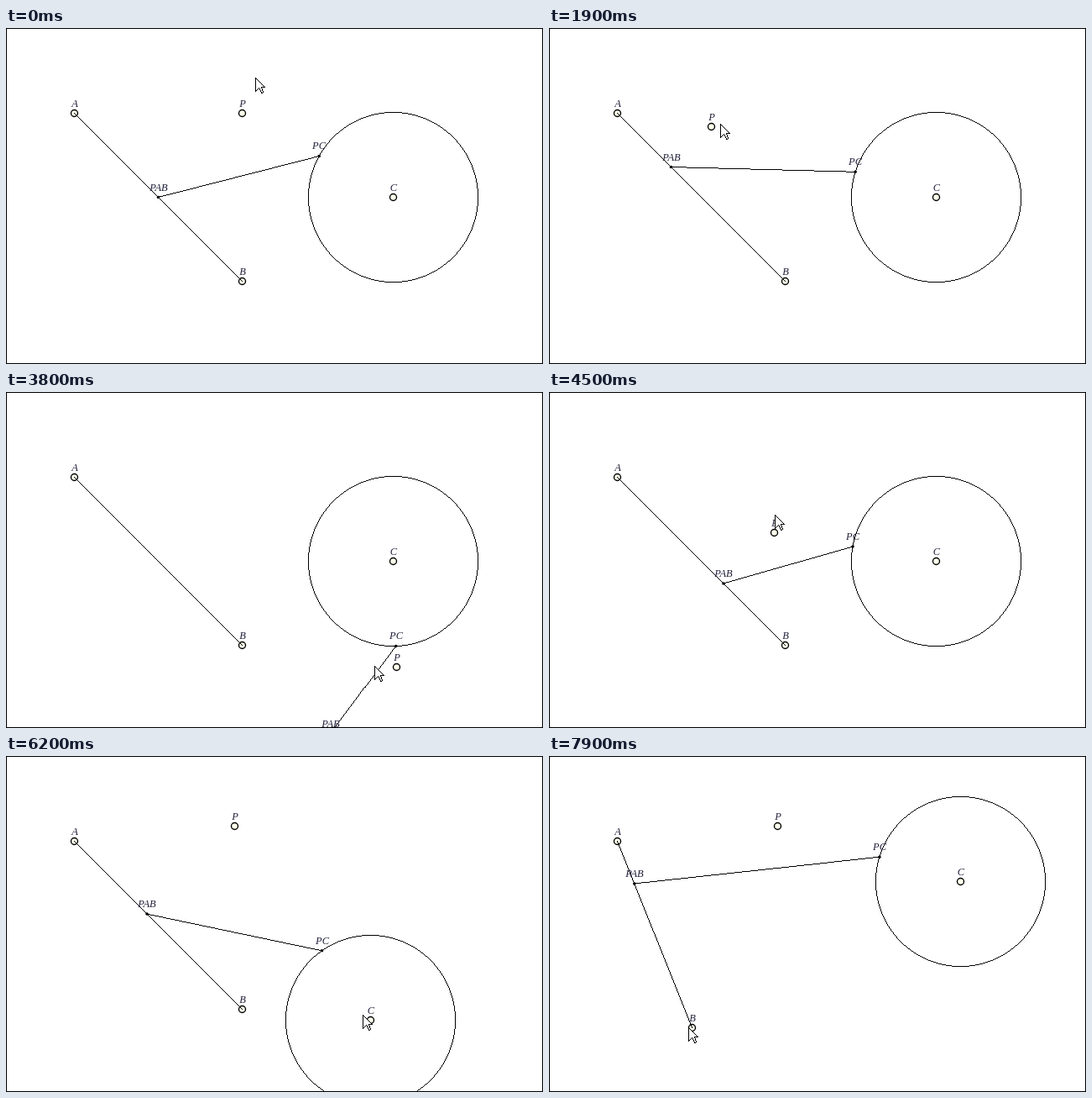
These frames come from a looping animation (640x400 px, 8 s). An HTML page with a canvas:

```html
<!DOCTYPE html>
<html lang="en">
<head>
<meta charset="utf-8">
<title>Nearest points on a line and a circle</title>
<style>
html, body { margin: 0; width: 100%; height: 100%; overflow: hidden; background: #fff; }
canvas { display: block; }
</style>
</head>
<body>
<canvas id="stage" width="640" height="400"></canvas>
<script>
const ctx = document.getElementById('stage').getContext('2d');
const LOOP = 8000, STEP = 100, LAG = 75, RADIUS = 101;
const INK = '#000', LABEL = '#22223c', FILL = '#ffffec';

const A = { x: 81, y: 101 };
const REST = { x: 297, y: 59 };

// The hand drags P, C and B in turn; each stop is [ms, x, y].
const dragP = [
  [500, 281, 101], [1200, 175, 114], [1900, 193, 117], [2400, 320, 83], [2900, 488, 61],
  [3350, 585, 170], [3800, 465, 327], [4300, 285, 220], [4800, 272, 83]
];
const dragC = [[5200, 461, 201], [5750, 506, 262], [6200, 434, 314], [6600, 410, 240], [7000, 490, 149]];
const dragB = [[7350, 281, 301], [7900, 170, 323], [8000, 166, 323]];

const clamp = (v, lo, hi) => Math.min(hi, Math.max(lo, v));
const round = p => ({ x: Math.round(p.x), y: Math.round(p.y) });
const floor = p => ({ x: Math.floor(p.x), y: Math.floor(p.y) });

// Smooth curve through the stops, resting at both ends.
function follow(stops, t) {
  const last = stops.length - 1;
  t = clamp(t, stops[0][0], stops[last][0]);
  let i = 0;
  while (i < last - 1 && stops[i + 1][0] < t) i++;
  const span = stops[i + 1][0] - stops[i][0];
  const u = (t - stops[i][0]) / span, v = 1 - u;
  const slope = (k, axis) => {
    const a = stops[Math.max(k - 1, 0)], b = stops[Math.min(k + 1, last)];
    return (b[axis] - a[axis]) / (b[0] - a[0]);
  };
  const mix = axis =>
    v * v * (1 + 2 * u) * stops[i][axis] + u * u * (3 - 2 * u) * stops[i + 1][axis] +
    span * u * v * (v * slope(i, axis) - u * slope(i + 1, axis));
  return round({ x: mix(1), y: mix(2) });
}

// A held point trails the cursor by LAG; between drags the cursor glides over.
function cursorAt(t) {
  let from = REST, since = 0;
  for (const stops of [dragP, dragC, dragB]) {
    const begin = stops[0][0], end = stops[stops.length - 1][0];
    if (t < begin) {
      const to = follow(stops, begin + LAG);
      const u = (t - since) / (begin - since), e = u * u * (3 - 2 * u);
      return round({ x: from.x + (to.x - from.x) * e, y: from.y + (to.y - from.y) * e });
    }
    from = follow(stops, t + LAG);
    since = end;
    if (t < end) break;
  }
  return from;
}

function footOnLine(p, a, b) {
  const dx = b.x - a.x, dy = b.y - a.y;
  const k = ((p.x - a.x) * dx + (p.y - a.y) * dy) / (dx * dx + dy * dy);
  return { x: a.x + k * dx, y: a.y + k * dy };
}

function nearestOnCircle(p, c) {
  const k = RADIUS / (Math.hypot(p.x - c.x, p.y - c.y) || 1);
  return { x: c.x + (p.x - c.x) * k, y: c.y + (p.y - c.y) * k };
}

const plot = (x, y) => ctx.fillRect(Math.round(x), Math.round(y), 1, 1);

// Hard-edged line, one pixel wide.
function line(a, b) {
  const dx = b.x - a.x, dy = b.y - a.y;
  const n = Math.ceil(Math.max(Math.abs(dx), Math.abs(dy))) || 1;
  ctx.fillStyle = INK;
  for (let i = 0; i <= n; i++) plot(a.x + dx * i / n, a.y + dy * i / n);
}

function ring(c, r) {
  ctx.fillStyle = INK;
  for (let i = 0; i <= r * Math.SQRT1_2; i++) {
    const j = Math.sqrt(r * r - i * i);
    for (const sx of [-1, 1]) for (const sy of [-1, 1]) {
      plot(c.x + sx * i, c.y + sy * j);
      plot(c.x + sx * j, c.y + sy * i);
    }
  }
}

function handle(p) {
  ctx.beginPath();
  ctx.arc(p.x + 0.5, p.y + 0.5, 4, 0, Math.PI * 2);
  ctx.fillStyle = FILL;
  ctx.fill();
  ctx.lineWidth = 1.4;
  ctx.strokeStyle = INK;
  ctx.stroke();
}

function dot(p) {
  ctx.beginPath();
  ctx.arc(p.x + 0.5, p.y + 0.5, 1.8, 0, Math.PI * 2);
  ctx.fillStyle = INK;
  ctx.fill();
}

function label(text, p) {
  const { x, y } = floor(p);
  ctx.fillStyle = LABEL;
  ctx.fillText(text, x + 1, y - 7);
}

function cursor(p) {
  const tips = [[0, 0], [0, 16], [4, 12], [7, 18], [9, 17], [7, 11], [11, 11]]
    .map(([x, y]) => ({ x: p.x + x, y: p.y + y }));
  ctx.beginPath();
  for (const q of tips) ctx.lineTo(q.x + 0.5, q.y + 0.5);
  ctx.fillStyle = '#fff';
  ctx.fill();
  tips.forEach((q, i) => line(q, tips[(i + 1) % tips.length]));
}

function draw(t) {
  const P = follow(dragP, t), B = follow(dragB, t), C = follow(dragC, t);
  const onLine = footOnLine(P, A, B), onCircle = nearestOnCircle(P, C);

  ctx.fillStyle = '#fff';
  ctx.fillRect(0, 0, 640, 400);
  ctx.font = 'italic 12.5px "Liberation Serif", serif';
  ctx.textAlign = 'center';

  ring(C, RADIUS);
  [A, B, C, P].forEach(handle);
  line(A, B);
  line(onLine, onCircle);
  [onLine, onCircle].forEach(dot);

  const names = { A, B, C, P, PAB: onLine, PC: onCircle };
  for (const name in names) label(name, names[name]);
  cursor(cursorAt(t));

  ctx.lineWidth = 1;
  ctx.strokeStyle = INK;
  ctx.strokeRect(0.5, 0.5, 639, 399);
}

const start = performance.now();
function tick() {
  const t = (performance.now() - start) % LOOP;
  draw(Math.floor(t / STEP) * STEP);
  requestAnimationFrame(tick);
}
tick();
</script>
</body>
</html>
```
